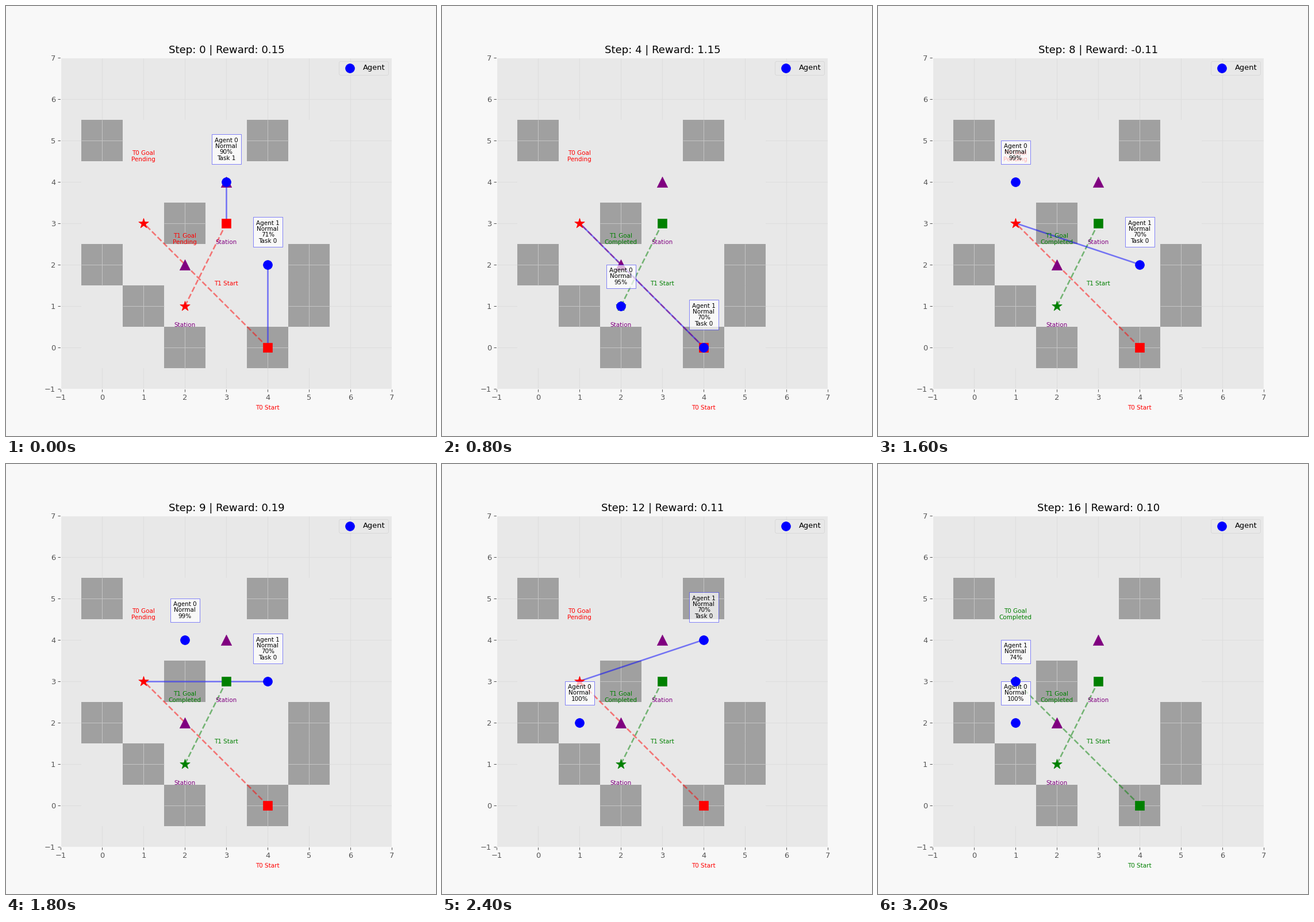
A matplotlib script for the animation above (3400 ms loop, 748 by 748 pixels).

```python
import numpy as np
import matplotlib.pyplot as plt
from matplotlib.animation import FuncAnimation
from matplotlib.colors import ListedColormap

STEPS = 17
DECAY, CHARGE = 0.1, 5
FLOOR, WALL = "#e8e8e8", "#a0a0a0"
OBSTACLES = [(0, 5), (4, 5), (2, 3), (0, 2), (1, 1), (5, 2), (5, 1), (2, 0), (4, 0)]
STATIONS = [(3, 4), (2, 2)]
TASKS = [((4, 0), (1, 3)), ((3, 3), (2, 1))]  # start, goal

plt.rcParams.update({
    "font.family": "DejaVu Sans", "font.size": 10,
    "axes.facecolor": FLOOR, "axes.edgecolor": "#f8f8f8",
    "axes.linewidth": 1, "axes.axisbelow": True, "patch.linewidth": 0.5,
    "xtick.color": "#555555", "ytick.color": "#555555",
})


def along(keys):
    """Values at every step, linear between (step, value, ...) keys."""
    times, *columns = zip(*keys)
    return np.transpose([np.interp(range(STEPS), times, column) for column in columns])


class Agent:
    def __init__(self, index, task, battery, keys):
        self.index, self.task = index, task
        self.path = [(int(x), int(y)) for x, y in along(keys).round()]
        self.start, self.goal = TASKS[task]
        self.pickup = self.path.index(self.start)
        self.delivery = self.path.index(self.goal)
        self.battery = [battery]
        for pos in self.path[1:]:
            gain = CHARGE if pos in STATIONS else 0
            self.battery.append(min(100, self.battery[-1] - DECAY + gain))


# After step 11 the idle agent paces between two cells
pacing = [(step, 1 + step % 2, 2) for step in range(11, STEPS)]
AGENTS = [
    Agent(0, 1, 90.25, [(0, 3, 4), (1, 3, 3), (2, 2, 3), (4, 2, 1), (7, 2, 4),
                        (8, 1, 4), (9, 2, 4), *pacing]),
    Agent(1, 0, 70.75, [(2, 4, 2), (4, 4, 0), (6, 4, 2), (8, 4, 2), (9, 4, 3),
                        (10, 4, 2), (12, 4, 4), (15, 1, 4), (16, 1, 3)]),
]
DELIVERY = {agent.task: agent.delivery for agent in AGENTS}
REWARD = along([(0, 0.15), (2, 0.91), (4, 1.15), (6, 0.28), (7, -0.11),
                (8, -0.11), (9, 0.19), (12, 0.11), (16, 0.10)])[:, 0]

fig, ax = plt.subplots(figsize=(8, 8), dpi=93.5, facecolor="#f8f8f8")


def segment(a, b, **style):
    ax.plot([a[0], b[0]], [a[1], b[1]], **style)


def marker(pos, shape, color, size, zorder=2.5):
    ax.scatter(*pos, s=size, c=color, marker=shape, zorder=zorder)


def label(pos, dy, text, color, **style):
    ax.text(pos[0], pos[1] + dy, text, color=color, fontsize=8, ha="center",
            linespacing=1.05, **style)


def draw_board():
    ax.grid(True, color="#dedede", lw=0.8)
    cells = np.zeros((6, 6))
    cross = dict(color="#c4c4c4", lw=0.8, zorder=0.8, solid_capstyle="butt")
    for x, y in OBSTACLES:
        cells[y, x] = 1
        segment((x - 0.5, y), (x + 0.5, y), **cross)
        segment((x, y - 0.5), (x, y + 0.5), **cross)
    ax.imshow(cells, cmap=ListedColormap([FLOOR, WALL]), origin="lower",
              interpolation="nearest", zorder=0.7)
    ax.set(xlim=(-1, 7), ylim=(-1, 7), aspect="equal",
           xticks=range(-1, 8), yticks=range(-1, 8))
    for pos in STATIONS:
        marker(pos, "^", "purple", 200)
        label(pos, -1.5, "Station", "purple")


def draw_task(index, step):
    start, goal = TASKS[index]
    done = step >= DELIVERY[index]
    color = "green" if done else "red"
    status = "Completed" if done else "Pending"
    segment(start, goal, color=color, ls="--", lw=2, alpha=0.5)
    marker(start, "s", color, 150)
    marker(goal, "*", color, 200)
    label(start, -1.5, f"T{index} Start", color)
    label(goal, 1.5, f"T{index} Goal\n{status}", color)


def draw_agent(agent, step):
    pos = agent.path[step]
    text = f"Agent {agent.index}\nNormal\n{agent.battery[step]:.0f}%"
    if step < agent.delivery:
        text += f"\nTask {agent.task}"
        target = agent.goal if step >= agent.pickup else agent.start
        segment(pos, target, color="blue", lw=2, alpha=0.5)
    marker(pos, "o", "blue", 150, zorder=4)
    label(pos, 0.5, text, "black", va="bottom",
          bbox=dict(facecolor="white", edgecolor="blue", alpha=0.7))


def draw(step):
    ax.cla()
    draw_board()
    for index in range(len(TASKS)):
        draw_task(index, step)
    for agent in AGENTS:
        draw_agent(agent, step)
    ax.scatter([], [], s=150, c="blue", label="Agent")
    ax.legend(loc="upper right", facecolor=FLOOR)
    ax.set_title(f"Step: {step} | Reward: {REWARD[step]:.2f}", fontsize=14)
    return []


anim = FuncAnimation(fig, draw, frames=STEPS, init_func=lambda: [],
                     interval=200, repeat=True, repeat_delay=0)
plt.show()
```
